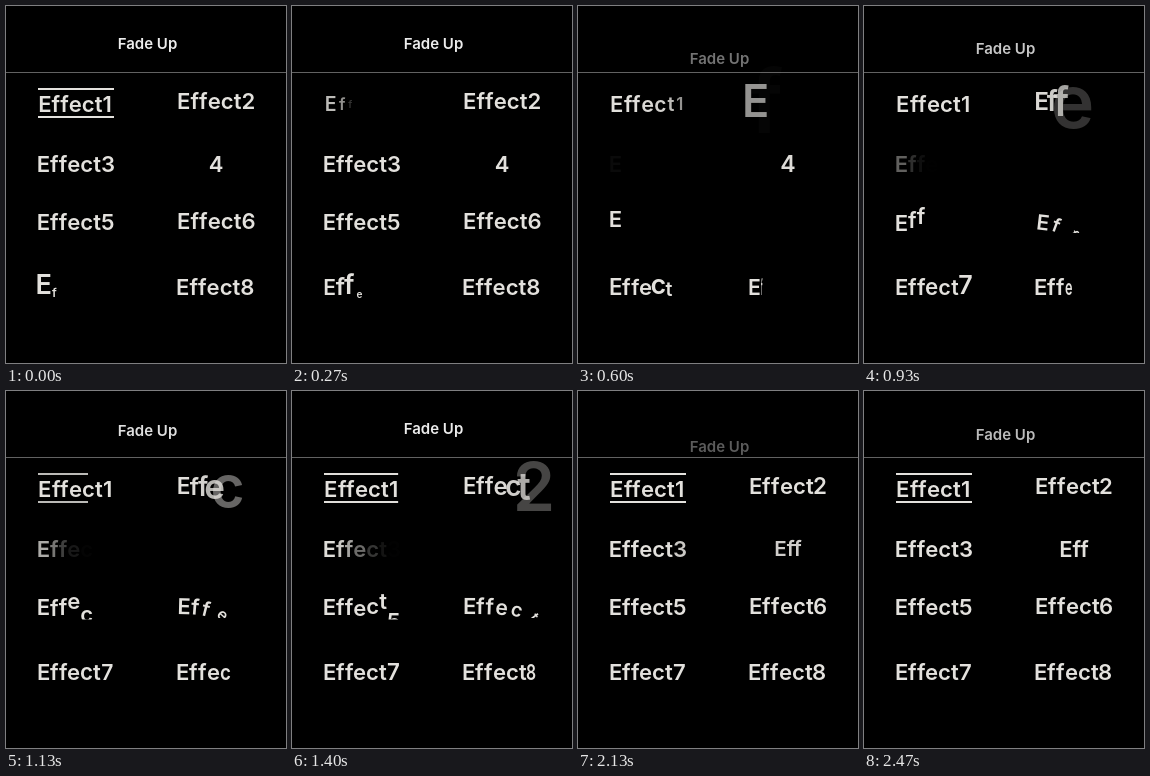
Animation, 280 px wide and 357 px high, one loop 2530 ms. Source, as an HTML page:

```html
<!DOCTYPE html>
<html lang="en">
<head>
<meta charset="utf-8">
<title>Text effects</title>
<style>
  html, body { margin: 0; width: 100%; height: 100%; overflow: hidden; background: #000; }
  #stage {
    position: relative; width: 280px; height: 357px; overflow: hidden;
    color: #e3e1dd; font: 600 22.1px/26px Inter, "Liberation Sans", sans-serif;
  }
  #title {
    position: absolute; left: 1.5px; width: 280px; top: 27px; text-align: center;
    font-size: 15px; line-height: 21px; color: #ededed;
  }
  #rule { position: absolute; left: 0; top: 66px; width: 100%; height: 1px; background: #626262; }
  .word { position: absolute; white-space: pre; height: 26px; }
  .word span { display: inline-block; height: 26px; vertical-align: top; }
  .clip { clip-path: inset(-20px -20px 0.5px); }
  .bar {
    position: absolute; left: 0; width: 76px; height: 2px;
    background: currentColor; transform-origin: 0 50%;
  }
  .pop span { transform-origin: 50% 100%; }
  .flip span { transform-origin: 0 50%; }
  #swap { left: 160px; width: 100px; text-align: center; }
</style>
</head>
<body>
<div id="stage">
  <div id="title">Fade Up</div>
  <div id="rule"></div>
  <div id="swap" class="word"></div>
</div>
<script>
const LOOP = 2530, STEP = 1000 / 15, ASCENT = 21, GAP = 149, RESET = 500;
const stage = document.getElementById('stage');
const title = document.getElementById('title');
const swap = document.getElementById('swap');

const clamp = x => Math.min(1, Math.max(0, x));
const outExpo = x => x <= 0 ? 0 : x >= 1 ? 1 : 1 - 2 ** (-10 * x);
const inExpo = x => x <= 0 ? 0 : 2 ** (10 * (clamp(x) - 1));
const inOutQuad = x => x < 0.5 ? 2 * x * x : 1 - 2 * (1 - x) ** 2;
const spring = (t, decay, freq) => Math.exp(-decay * t) * Math.cos(freq * t);

const REST = { opacity: 1, transform: 'none' };
const HIDDEN = { opacity: 0, transform: 'none' };
const set = (el, style) => Object.assign(el.style, style);

// Each effect maps the time and letter index to a style.
function grow(t, i) {
  if (t < 60) return REST;
  const p = outExpo((t - 112 - 66 * i) / 600);
  return { opacity: p, transform: `scale(${0.3 + 0.7 * p})` };
}

function zoom(t, i) {
  if (t < RESET) return REST;
  const p = outExpo((t - 447 - 150 * i) / 1000);
  return { opacity: p, transform: `scale(${4 - 3 * p})` };
}

function fade(t, i) {
  if (t < RESET) return REST;
  return { opacity: inOutQuad(clamp((t - 450 - 147 * i) / 1044)), transform: 'none' };
}

function rise(t, i) {
  if (t < RESET) return REST;
  const e = t - 450 - GAP * i;
  if (e <= 0) return HIDDEN;
  return { opacity: 1, transform: `translateY(${26 * spring(e, 0.006, 0.0125)}px)` };
}

function swing(t, i) {
  if (t < RESET) return REST;
  const e = t - 610 - GAP * i;
  if (e <= 0) return HIDDEN;
  const r = Math.exp(-0.0075 * e);
  return {
    opacity: 1,
    transform: `translate(${15 * r}px, ${15 * r}px) rotate(${75 * r}deg) scale(${1 - 0.5 * r})`
  };
}

function pop(t, i) {
  const e = t + 208 - 139 * i;
  if (e <= 0) return HIDDEN;
  return { opacity: 1, transform: `scale(${1 - spring(e, 0.006, 0.012)})` };
}

function flip(t, i) {
  if (t < RESET) return REST;
  const e = t - 440 - GAP * i;
  if (e <= 0) return HIDDEN;
  return { opacity: 1, transform: `scaleX(${Math.cos(Math.PI / 2 * Math.exp(-0.0107 * e))})` };
}

// text, left, baseline, effect, class
const words = [
  ['Effect1', 32.2, 106, grow, ''],
  ['Effect2', 171.1, 103, zoom, ''],
  ['Effect3', 30.7, 166, fade, ''],
  ['Effect5', 30.7, 224, rise, 'clip'],
  ['Effect6', 171.1, 222.5, swing, 'clip'],
  ['Effect7', 30.7, 289, pop, 'pop'],
  ['Effect8', 170, 289, flip, 'flip']
].map(([text, x, y, effect, cls]) => {
  const el = document.createElement('div');
  el.className = 'word ' + cls;
  set(el, { left: x + 'px', top: y - ASCENT + 'px' });
  const letters = [...text].map(ch => {
    const s = document.createElement('span');
    s.textContent = ch;
    el.append(s);
    return s;
  });
  stage.append(el);
  return { el, letters, effect };
});

const bars = [-3, 25].map(top => {
  const bar = document.createElement('div');
  bar.className = 'bar';
  bar.style.top = top + 'px';
  words[0].el.append(bar);
  return bar;
});
swap.style.top = 166 - ASCENT + 'px';

function drawTitle(t) {
  const start = t < 340 ? -LOOP : t < 1940 ? 340 : 1940;
  const rest = (1 - clamp((t - start) / 1300)) ** 3;
  set(title, { opacity: 1 - rest, transform: `translateY(${28.5 * rest}px)` });
}

function drawBars(t) {
  const p = t < 60 ? 1 : outExpo((t - 1025) / 700);
  const style = { opacity: p ? 0.5 + 0.5 * p : 0, transform: `scaleX(${p})` };
  bars.forEach(bar => set(bar, style));
}

function drawSwap(t) {
  if (t < 1400) {
    const p = inExpo((t - 350) / 550);
    swap.textContent = '4';
    set(swap, { opacity: 1 - p, transform: `scale(${1 + 2 * p})` });
  } else {
    const p = outExpo((t - 1850) / 800);
    swap.textContent = 'Eff';
    set(swap, { opacity: p, transform: `scale(${0.2 + 0.8 * p})` });
  }
}

function draw(ms) {
  const t = Math.floor((ms % LOOP + 5) / STEP) * STEP % LOOP;
  drawTitle(t);
  drawBars(t);
  drawSwap(t);
  for (const { letters, effect } of words) {
    letters.forEach((s, i) => set(s, effect(t, i)));
  }
}

const begin = performance.now();
function tick() {
  draw(performance.now() - begin);
  requestAnimationFrame(tick);
}
tick();
</script>
</body>
</html>
```
